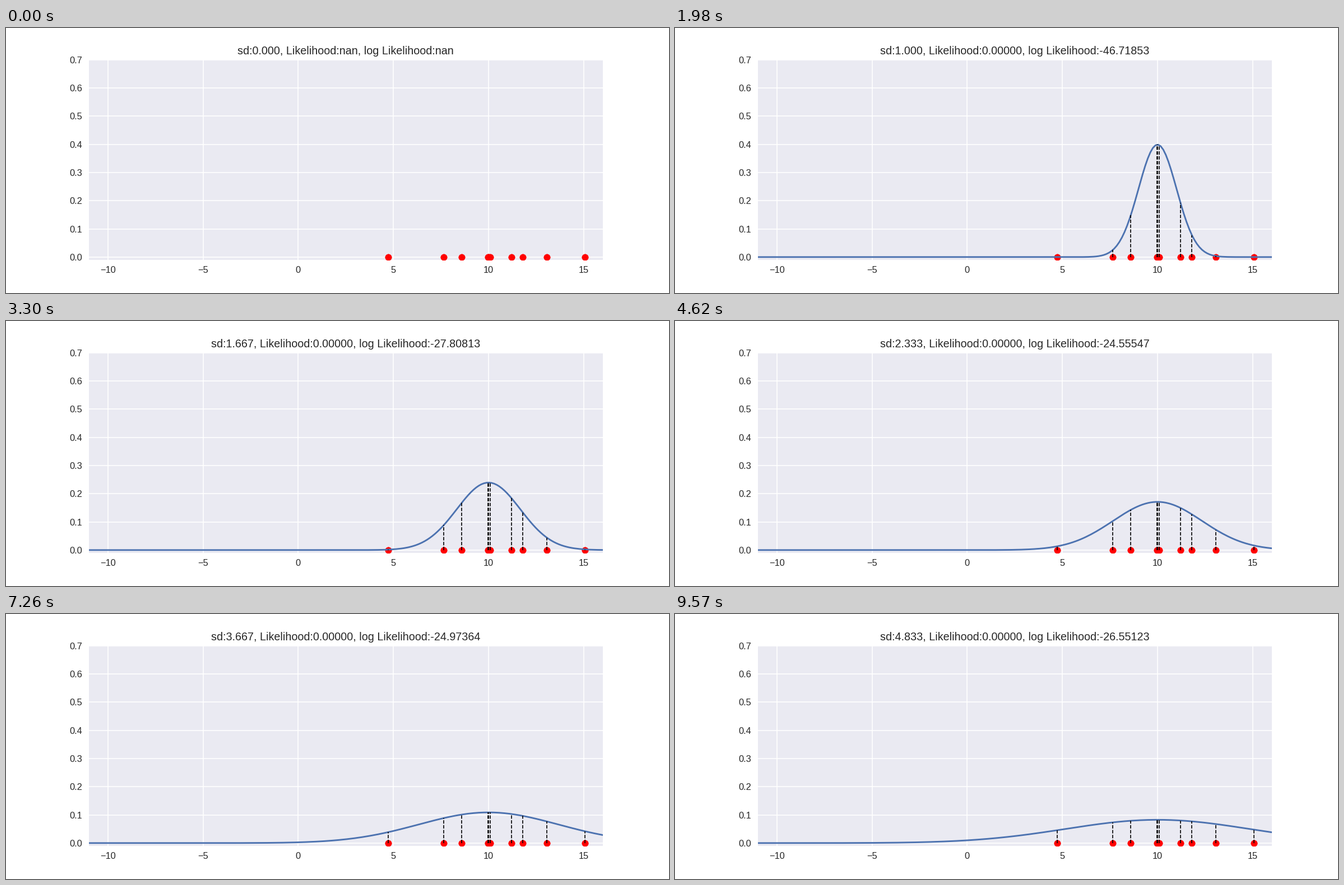
A matplotlib script for the animation above (9.9 s loop, 1183x473 px).

```python
import numpy as np
import matplotlib.pyplot as plt
from matplotlib.animation import FuncAnimation

WIDTH, HEIGHT, DPI = 1183, 473, 128
PT = WIDTH / 10 / DPI  # styled as a 10-inch-wide figure
FRAMES, INTERVAL = 30, 330
MEAN = 10
INK = "0.15"

samples = np.array([4.739, 7.651, 8.596, 9.96, 10.0, 10.104,
                    11.209, 11.807, 13.064, 15.0757964])
xs = np.linspace(-11, 16, 200)


def log_pdf(x, sd):
    return -0.5 * ((x - MEAN) / sd) ** 2 - np.log(sd * np.sqrt(2 * np.pi))


plt.rcParams["font.family"] = "Liberation Sans"
fig = plt.figure(figsize=(WIDTH / DPI, HEIGHT / DPI), dpi=DPI, facecolor="white")
ax = fig.add_axes([0.125, 0.125, 0.775, 0.755], facecolor="#EAEAF2")
ax.set(xlim=(-11, 16), ylim=(-0.01, 0.7),
       xticks=np.arange(-10, 16, 5), yticks=np.arange(8) / 10)
ax.set_axisbelow(True)
ax.grid(color="white", linewidth=PT, solid_capstyle="round")
ax.tick_params(length=0, pad=7 * PT, labelsize=10 * PT, labelcolor=INK)
for spine in ax.spines.values():
    spine.set_visible(False)

title = ax.set_title("", fontsize=12 * PT, color=INK, pad=6 * PT, y=1.0)
ax.scatter(samples, np.zeros_like(samples), s=49 * PT ** 2, color="red",
           linewidth=0.3 * PT, zorder=1)
curve, = ax.plot([], [], color="#4C72B0", linewidth=1.75 * PT,
                 solid_capstyle="round", zorder=2)
stems = ax.vlines(samples, 0, 0, colors="black", linestyles="dashed",
                  linewidth=PT, zorder=2.1)


def update(frame):
    sd = frame / 6
    if sd == 0:
        curve.set_data([], [])
        stems.set_segments([])
        likelihood = log_likelihood = np.nan
    else:
        curve.set_data(xs, np.exp(log_pdf(xs, sd)))
        logs = log_pdf(samples, sd)
        stems.set_segments([[(x, 0), (x, y)] for x, y in zip(samples, np.exp(logs))])
        log_likelihood = logs.sum()
        likelihood = np.exp(log_likelihood)
    title.set_text(f"sd:{sd:.3f}, Likelihood:{likelihood:.5f}, "
                   f"log Likelihood:{log_likelihood:.5f}")
    return curve, stems, title


animation = FuncAnimation(fig, update, frames=FRAMES, interval=INTERVAL,
                          repeat=True, repeat_delay=0, blit=False)
plt.show()
```
